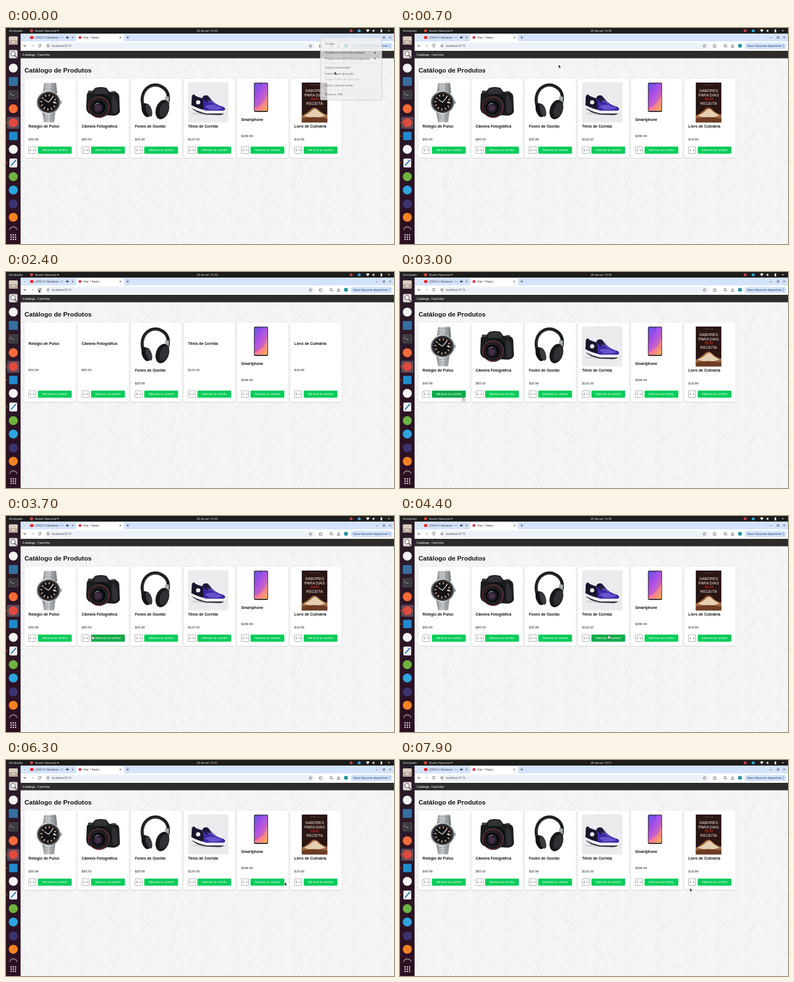
Animation of 692x388 px, one loop 8 s. Source, as an HTML page:

```html
<!DOCTYPE html>
<html lang="pt-BR">
<meta charset="utf-8">
<title>Catálogo de Produtos</title>
<style>
html, body { margin: 0; width: 100%; height: 100%; overflow: hidden; background: #f5f5f5 }
svg { display: block; width: 692px; height: 388px }
text { font-family: "Liberation Sans", Arial, sans-serif; white-space: pre }
.ui text, text.ui { font-family: "Open Sans", sans-serif; font-weight: 500 }
.line { fill: none; stroke: #45494e; stroke-width: .8 }
</style>
<svg id="stage" viewBox="0 0 692 388"></svg>
<script>
const rect = (x, y, w, h, fill, r = 0, more = '') =>
  `<rect x="${x}" y="${y}" width="${w}" height="${h}" rx="${r}" fill="${fill}" ${more}/>`;
const disc = (x, y, r, fill, more = '') => `<circle cx="${x}" cy="${y}" r="${r}" fill="${fill}" ${more}/>`;
const path = (d, fill, more = '') => `<path d="${d}" fill="${fill}" ${more}/>`;
const line = (d, more = '') => `<path class="line" d="${d}" ${more}/>`;
const text = (x, y, size, str, fill = '#111', more = '') =>
  `<text x="${x}" y="${y}" font-size="${size}" fill="${fill}" ${more}>${str}</text>`;
const repeat = (n, fn) => Array.from({ length: n }, (_, i) => fn(i)).join('');
const bold = 'font-weight="700"';

let seed = 7;
const random = () => (seed = seed * 16807 % 2147483647) / 2147483647;

const defs = `<defs>
  <pattern id="doodles" width="54" height="54" patternUnits="userSpaceOnUse">${rect(0, 0, 54, 54, '#f4f4f4')}
    ${repeat(75, i => disc(2 + random() * 50, 2 + random() * 50, .5 + random() * 1.2, i % 3 ? '#fbfbfa' : 'none',
      i % 3 ? '' : 'stroke="#eee9e2" stroke-width=".6"'))}</pattern>
  <linearGradient id="screen" x1="0" y1="0" x2=".7" y2="1"><stop stop-color="#5b55e8"/><stop offset=".45" stop-color="#b44be0"/>
    <stop offset=".7" stop-color="#f0669c"/><stop offset="1" stop-color="#f6a45c"/></linearGradient>
  <linearGradient id="steel"><stop stop-color="#777b80"/><stop offset=".35" stop-color="#e2e4e6"/>
    <stop offset=".65" stop-color="#b4b7ba"/><stop offset="1" stop-color="#74777b"/></linearGradient>
  <linearGradient id="dock" x2="0" y2="1"><stop stop-color="#2b1c2b"/><stop offset="1" stop-color="#2c0f22"/></linearGradient>
  <linearGradient id="tabFade"><stop offset=".8" stop-color="#333"/><stop offset="1" stop-color="#333" stop-opacity="0"/></linearGradient>
  <filter id="shadow" x="-10%" y="-10%" width="120%" height="120%"><feDropShadow dx="0" dy=".7" stdDeviation="1" flood-opacity=".16"/></filter>
</defs>`;

const topBar = `<g class="ui">${rect(0, 0, 692, 10, '#1c1c1c')}
  ${text(5, 6.9, 5.2, 'Atividades', '#eee')}${disc(45.5, 5, 2.8, '#dc4437')}
  ${text(51, 6.9, 5.5, 'Tavelo Navume', '#eee')}${path('M91 4h3.4l-1.7 2.2z', '#ddd')}
  ${text(340, 6.9, 5.3, '29 de set', '#eee')}<text id="clock" x="364" y="6.9" font-size="5.3" fill="#eee"></text>
  ${disc(615.5, 5, 2.7, '#b64048')}${disc(630, 5, 2.6, '#3aa5dc')}
  ${path('M642 3.6q3.2-2.5 6.4 0L645.2 7.8z', '#eee')}
  ${path('M653.5 4h1.3l2-1.7v5.4l-2-1.7h-1.3z', '#eee')}
  ${rect(668, 2.5, 3, 5.3, '#eee', .5)}${path('M681 4h3.6l-1.8 2.2z', '#ddd')}</g>`;

const appColors = { 72: '#f2f2f2', 145: '#ff6c37', 170: '#e04a3d', 218: '#f4f6f4', 267: '#6db33f', 291: '#2ea5df', 316: '#3b3270', 340: '#f58220' };
const dock = rect(0, 10, 26, 378, 'url(#dock)') + rect(2, 159.5, 22, 21.5, '#5c4a58', 3) +
  Object.entries(appColors).map(([y, c]) => disc(13, y, 8, c)).join('') +
  rect(5, 15, 16, 15, '#d8cdc0', 2) + rect(5, 22, 16, 8, '#b9a99a', 1.5) + rect(10, 24.5, 6, 1.5, '#fff', .5) +
  rect(5.5, 39.5, 15, 15, '#dedcd8', 2) + disc(12.5, 46, 4, '#f7f7f7', 'stroke="#555"') + line('M15.5 49l4 4.5', 'style="stroke-width:1.6"') +
  rect(5, 88, 16, 16, '#356f9f', 2) +
  rect(5, 112.5, 16, 15, '#3a3a3d', 2, 'stroke="#6b696b" stroke-width=".7"') + line('M8 117l2 1.7-2 1.7M11.5 121h3.5', 'style="stroke:#eee"') +
  rect(5.5, 186.5, 15, 15, '#238ad1', 2) +
  rect(6, 234.5, 14, 16, '#f1f1f1', 2) + line('M9 247L18 237', 'style="stroke:#3079c7;stroke-width:2"') +
  path('M5.5 363a7.5 7 0 0 1 15 0l-1.6 0a6 5.5 0 0 0-11.8 0z', '#777079') +
  [170, 194, 242].map(y => disc(1.3, y, .9, '#e95420')).join('') +
  repeat(9, i => rect(7.8 + i % 3 * 4, 370.4 + (i / 3 | 0) * 4, 2.4, 2.4, '#f3f3f3', .8));

const browser = `<g class="ui">${rect(26, 10, 666, 14, '#d3e3fd')}${rect(26, 24, 666, 17, '#fff')}
  ${disc(33, 17, 4, '#e3edfd')}${line('M31.6 16.4l1.4 1.4 1.4-1.4')}
  ${rect(43, 14.8, 6, 4.6, '#ee1c1c', 1)}${text(52, 18.8, 5.2, "(340) F's Meadow - Nu", 'url(#tabFade)')}
  ${path('M107 16h1.3l2-1.6v5.2l-2-1.6h-1.3z', '#333')}${line('M111.3 15.5q1.4 1.5 0 3')}
  ${line('M117.5 15.5l3 3m0-3l-3 3')}
  ${path('M123 24q2.5 0 2.5-3V14q0-2.5 2.5-2.5h80q2.5 0 2.5 2.5v7q0 3 2.5 3z', '#fff')}
  ${disc(132, 17, 2.6, '#d8344c')}${text(138, 18.8, 5.3, 'Vite + React', '#222')}
  ${line('M202.5 15.5l3 3m0-3l-3 3M214.6 17h5m-2.5-2.5v5')}
  ${line('M659.5 17.6h3.4M672.6 15.6h3v3h-3zM683.7 15.5l3 3m0-3l-3 3')}
  ${line('M36.3 32h-4.6m2.1-2.1L31.7 32l2.1 2.1')}${line('M44.7 32h4.6m-2.1-2.1l2.1 2.1-2.1 2.1', 'opacity=".4"')}
  ${disc(60, 32, 5, '#e3e7ee', 'id="reloadHalo"')}${line('M62 30.7a2.4 2.4 0 1 0 .3 1.7M62.3 29.3v1.7h-1.7')}
  ${rect(70, 26.3, 481, 11.6, '#edf2fa', 5.8)}${disc(75, 32, 3.9, '#fff')}${disc(75, 32, 2.2, 'none', 'class="line"')}${line('M75 31.6v1.6m0-2.7v.5')}
  ${text(82, 33.9, 5.05, 'localhost:5173', '#333')}
  ${line('M543 29.5l.8 1.7 1.9.2-1.4 1.3.4 1.9-1.7-.9-1.7.9.4-1.9-1.4-1.3 1.9-.2z', 'style="stroke-width:.6"')}
  ${line('M559 30.5h1.4q.6-1.8 1.2 0h1.5v1.5q1.8.6 0 1.2v1.5h-4.1z')}
  ${line('M577.5 30h5m-5 2h3m-3 2h2')}${disc(581.8, 33.5, 1.1, '#45494e')}
  ${line('M593.2 29v3.6m-1.7-1.5l1.7 1.7 1.7-1.7M590.7 33v1.6h5V33')}
  ${disc(606.3, 32, 3.4, '#128c92')}${text(606.3, 33.5, 4, 'C', '#fff', 'text-anchor="middle"')}
  ${rect(614.5, 26.5, 75, 11.4, '#d3e3fd', 5.7)}${text(619, 33.9, 5.3, 'Novo Navume disponível', '#10305e')}
  ${repeat(3, i => disc(684, 30 + i * 2, .55, '#10305e'))}</g>`;

const art = {
  watch: path('M28 1L49 1 51 20H25zM24 52H48L45 72H28z', 'url(#steel)') +
    repeat(5, i => line(`M27 ${4 + i * 3.4}H50M26 ${56 + i * 3.4}H47`, 'style="stroke:#686b70;stroke-width:.6"')) +
    line('M34 1v18M42 1v18M33 54v18M40 54v18', 'style="stroke:#7d8084;stroke-width:.6"') +
    rect(55, 33, 4, 6, '#9a9da1', 1) + disc(35.5, 36, 21, 'url(#steel)') + disc(35.5, 36, 19, '#2b2c2f') + disc(35.5, 36, 15.5, '#121214') +
    disc(35.5, 36, 17.2, 'none', 'stroke="#b9bbbd" stroke-width="1" stroke-dasharray=".6 3.9"') +
    disc(35.5, 36, 12.7, 'none', 'stroke="#d9a48a" stroke-width="3.4" stroke-dasharray="2.2 4.45"') +
    line('M35.5 36L28 31M35.5 36L43 27', 'style="stroke:#eee;stroke-width:1.2"') + rect(44, 34.5, 3.5, 3, '#ddd'),
  camera: path('M9 22Q10 17 18 17L24 10Q34 7 44 10L49 17 61 18Q67 20 67 27L68 53Q66 59 57 60L15 57Q8 54 8 45z', '#1c1d1f') +
    path('M24 12Q34 8 44 12L47 21H21z', '#303236') + rect(11, 15, 8, 4, '#3b3d41', 1) + rect(53, 16, 8, 3, '#3b3d41', 1) +
    path('M55 23Q65 25 64 53L57 57Q51 42 55 23z', '#2f3033') + disc(33, 42, 20.5, '#0d0e10') + disc(31, 44, 20, '#292b2e') +
    disc(30, 45, 17.5, '#151618', 'stroke="#a02a32" stroke-width="1"') + disc(30, 45, 13.5, '#08090b', 'stroke="#55575c" stroke-width=".8"') +
    disc(29, 46, 9, '#241d2d') + disc(29, 46, 5.5, '#452f48') + path('M22 42q4-6 10-5-6 2-10 5z', '#8a93a5'),
  phones: line('M16 48C5 14 29-1 46 7 59 13 62 25 58 39', 'style="stroke:#1d1e20;stroke-width:5.5"') +
    line('M15 38C11 16 28 2 45 8', 'style="stroke:#4a4c50;stroke-width:1"') + path('M54 25l7 1-1 14-7-3z', '#a9acb0') +
    '<ellipse cx="20" cy="50" rx="7.5" ry="13" fill="#111214" transform="rotate(-18 20 50)"/>' +
    '<ellipse cx="25" cy="50" rx="5" ry="12" fill="#393a3d" transform="rotate(-18 25 50)"/>' +
    '<ellipse cx="49" cy="49" rx="11.5" ry="18" fill="#17181a" transform="rotate(18 49 49)"/>' +
    '<ellipse cx="52" cy="49" rx="7.5" ry="13.5" fill="#2f3134" transform="rotate(18 52 49)"/>',
  shoe: rect(0, 0, 72, 72, '#ebebed') + '<ellipse cx="37" cy="56" rx="32" ry="3" fill="#d6d6d9"/>' +
    path('M5 38Q20 44 31 49L64 48Q70 52 65 57L32 57Q13 52 5 46z', '#f4f0f3') + path('M6 46Q16 52 32 56L64 56Q62 59 55 59L31 58Q12 54 6 46z', '#34303f') +
    path('M7 25Q9 19 14 25L25 29Q28 22 35 24L45 35Q53 42 63 44 69 48 64 51L32 51Q18 47 6 41z', '#3a2aa4') +
    path('M7 25Q9 19 14 25L25 29Q29 37 27 49 15 46 6 41z', '#17162b') + path('M25 29Q28 22 35 24L42 32 34 36z', '#1b1838') +
    path('M30 43Q41 38 51 42L62 46Q55 50 39 49z', '#6952cb') + line('M34 32l6 4M38 30l6 6M43 36l5 4', 'style="stroke:#a09ae0;stroke-width:.9"') + disc(18, 36, 3.8, '#f2f2f4'),
  phone: rect(22.8, .8, 25, 52.5, '#16171b', 2.2) + rect(23.8, 2, 23, 49.4, 'url(#screen)', 1.3) +
    path('M24 31Q38 20 37 2H46V25Q38 43 24 45z', '#9b5cf0', 'opacity=".45"') + path('M24 47Q41 42 46.8 21V38Q42 48 30 51.4H24z', '#ff8a8e', 'opacity=".55"') +
    disc(35.3, 3.8, .8, '#17171c'),
  book: rect(13.5, .5, 45.3, 71.5, '#2a1512') + rect(13.5, .5, 1.2, 71.5, '#150a08') + text(36.2, 5, 2, 'MARINA DO VALE', '#c8aca0', 'text-anchor="middle"') +
    ['SABORES', 'PARA DIAS', 'SEM', 'RECEITA'].map((s, i) => text(36.2, 17.5 + i * 7.5, 7, s, i == 2 ? '#d92a20' : '#f2ebe4', 'text-anchor="middle"')).join('') +
    path('M13.5 60Q25 54 31 47 37 43 43 49 49 56 58.8 58V72H13.5z', '#a46a42') + path('M17 60Q28 55 32 50 38 45 43 52L55 60Q35 67 17 60z', '#e5cfb2') +
    path('M13.5 65Q34 60 58.8 65V72H13.5z', '#6e3d23')
};

const products = [['Relógio de Pulso', '$50.99', 'watch'], ['Câmera Fotográfica', '$85.50', 'camera'], ['Fones de Ouvido', '$35.99', 'phones'],
  ['Tênis de Corrida', '$120.00', 'shoe'], ['Smartphone', '$299.99', 'phone'], ['Livro de Culinária', '$19.99', 'book']];
const cardX = i => 33 + i * 94.8;
const card = ([name, price, image], i) => {
  const short = image == 'phone';
  return `<g transform="translate(${cardX(i)} 0)">${rect(0, 91, 91.2, 142, '#fff', 2, 'filter="url(#shadow)"')}
    <g class="photo" transform="translate(7.3 97.5)">${art[image]}</g>
    <text class="name" x="7.3" y="${short ? 167.4 : 179.3}" font-size="6.75" ${bold} fill="#111">${name}</text>
    <text class="price" x="7.3" y="${short ? 196.2 : 202.2}" font-size="5.77" fill="#222">${price}</text>
    ${rect(7.5, 213.3, 13, 12.2, '#fff', .8, 'stroke="#767676" stroke-width=".6"')}${text(9.6, 221.2, 4.8, '1')}
    ${line('M15.6 218.6l1.4 1.5 1.4-1.5', 'style="stroke:#222"')}
    <rect class="buy" x="24" y="213" width="60.2" height="12.8" rx="1.5"/>
    ${text(54.1, 221.1, 4.8, 'Adicionar ao carrinho', '#fff', 'text-anchor="middle"')}</g>`;
};

const page = rect(26, 54, 666, 334, 'url(#doodles)') + rect(26, 41, 666, 13.4, '#2c2c2c') +
  text(29.5, 49.7, 5.77, 'Catálogo', '#fff') + text(56, 49.7, 5.77, 'Carrinho', '#fff') +
  text(33, 80, 11.53, 'Catálogo de Produtos', '#111', bold) + products.map(card).join('');

const menuItems = [[28, 'Ocultar'], [44.5, 'Projetar em tela cheia (prévia)'], [55, 'Projetar em tela cheia (programa)'], [71.5, 'Iniciar transmissão'],
  [82, 'Interromper gravação'], [92.3, 'Salvar buffer de repetição'], [103, 'Iniciar câmera virtual'], [119, 'Encerrar OBS']];
const menu = `<g id="menu" class="ui">${rect(560.5, 16.5, 110, 113, '#f0f0f0', 2, 'stroke="#b5b5b5" stroke-width=".7"')}
  ${menuItems.map(([y, s], i) => text(569, y + 1.9, 5.1, s, i == 5 ? '#aaa' : '#444')).join('')}
  ${[36, 63.3, 111].map(y => rect(569, y, 93, .4, '#ccc')).join('')}
  ${path('M657 42.5l2.4 2-2.4 2zM657 53l2.4 2-2.4 2z', '#333')}</g>`;

const pointer = `<g id="pointer"><g id="arrow">${path('M0 0V6.2L1.5 4.9 2.5 7.1 3.6 6.6 2.6 4.5H4.5z', '#111', 'stroke="#fff" stroke-width=".5"')}</g>
  <g id="hand">${path('M-.7.6Q0-.5.7.6V2.7L3 3.3Q3.6 3.6 3.4 4.6L2.8 6.8H-.7L-2.4 4.4Q-2.3 3.4-.7 4.3z', '#fff', 'stroke="#222" stroke-width=".5"')}</g></g>`;

const $ = id => document.getElementById(id);
$('stage').innerHTML = defs + page + browser + dock + topBar + menu + pointer;
const all = name => [...document.querySelectorAll('.' + name)];
const photos = all('photo'), names = all('name'), prices = all('price'), buttons = all('buy');

// time, x, y of the pointer tip
const route = [[0, 586, 78], [200, 586, 78], [1100, 66, 57], [1400, 57.5, 52.5], [1500, 57.5, 52.5], [1900, 58, 31], [2500, 58, 31],
  [2800, 112, 227], [3000, 113, 225.5], [3300, 96, 217], [3600, 96, 217], [3800, 213, 212.5], [4000, 213, 212.5], [4400, 372.5, 213.3],
  [4500, 372, 215], [4700, 372, 215], [4900, 372, 216], [5800, 372, 216], [6300, 497, 219.5], [6700, 546, 206], [6900, 560, 215], [7800, 560, 215], [7900, 517, 230], [8000, 517, 230]];

function pointerAt(t) {
  const i = route.findIndex(p => p[0] > t), [t0, x0, y0] = route[i - 1], [t1, x1, y1] = route[i];
  const u = (t - t0) / (t1 - t0), e = u * u * (3 - 2 * u);
  return [x0 + (x1 - x0) * e, y0 + (y1 - y0) * e];
}

function draw(now) {
  const t = Math.floor(now % 8000 / 100) * 100;
  const [x, y] = pointerAt(t);
  const hovered = products.findIndex((_, i) => x > cardX(i) + 24 && x < cardX(i) + 84.2 && y > 213 && y < 225.8);
  const pressed = t >= 4700 && t < 4900;
  buttons.forEach((b, i) => b.setAttribute('fill', i != hovered ? '#04cc59' : pressed ? '#09983f' : '#0bab48'));

  const loading = t >= 2200 && t < 2600;
  products.forEach(([, , image], i) => {
    if (image == 'phones' || image == 'phone') return;
    photos[i].style.display = loading ? 'none' : '';
    names[i].setAttribute('y', loading ? 131.3 : 179.3);
    prices[i].setAttribute('y', loading ? 178.2 : 202.2);
  });

  $('menu').setAttribute('opacity', Math.max(0, .8 - t / 200));
  $('clock').textContent = t < 5600 ? '15:30' : '15:31';
  $('reloadHalo').setAttribute('opacity', Math.hypot(x - 60, y - 32) < 5 ? 1 : 0);
  $('pointer').setAttribute('transform', `translate(${x} ${y})`);
  $('arrow').style.display = hovered < 0 ? '' : 'none';
  $('hand').style.display = hovered < 0 ? 'none' : '';
}

const start = performance.now();
function tick() {
  draw(performance.now() - start);
  requestAnimationFrame(tick);
}
tick();
</script>
</html>
```
